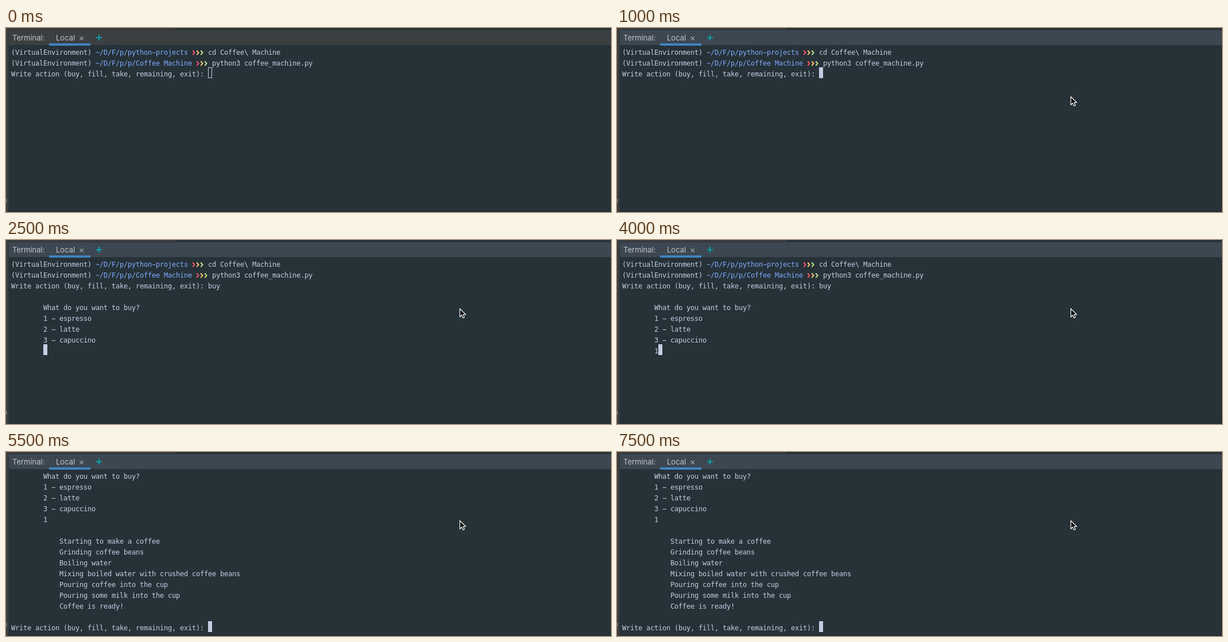
An HTML page with a canvas that plays this animation: 1054x323 px, repeating every 8 s.

```html
<!DOCTYPE html>
<html lang="en">
<head>
<meta charset="utf-8">
<title>Coffee machine terminal</title>
<style>
  html, body { margin: 0; width: 100%; height: 100%; overflow: hidden; background: #263238; }
  canvas { display: block; }
</style>
</head>
<body>
<canvas id="stage" width="1054" height="323"></canvas>
<script>
const ctx = document.getElementById("stage").getContext("2d");
const LOOP = 8000;
const LEFT = 9, TOP = 31, CELL = 7, ROW = 19;
const MONO = '12px "DejaVu Sans Mono", monospace';
const UI = '13px Inter, sans-serif';
const COLOR = {
  back: "#263238", text: "#c3cee3", path: "#82aaff",
  chevrons: ["#ff5370", "#ffcb6b", "#c3e88d"],
  frame: "#3c3f41", focused: "#3d4752", label: "#c0c4c8",
  tab: "#4083c0", plus: "#08a3ad"
};

const ASK = "Write action (buy, fill, take, remaining, exit): ";
const MENU = ["What do you want to buy?", "1 - espresso", "2 - latte", "3 - capuccino"];
const STEPS = [
  "Starting to make a coffee", "Grinding coffee beans", "Boiling water",
  "Mixing boiled water with crushed coffee beans", "Pouring coffee into the cup",
  "Pouring some milk into the cup", "Coffee is ready!"
];

function rect(x, y, w, h, color) {
  ctx.fillStyle = color;
  ctx.fillRect(x, y, w, h);
}

function line(points, color, width) {
  ctx.beginPath();
  points.forEach(([x, y]) => ctx.lineTo(x, y));
  ctx.strokeStyle = color;
  ctx.lineWidth = width;
  ctx.stroke();
}

// Every character sits in its own terminal cell.
function write(row, col, text, color = COLOR.text) {
  ctx.font = MONO;
  ctx.fillStyle = color;
  [...text].forEach((c, i) => {
    const glyph = c === "-" ? "\u2212" : c;
    ctx.fillText(glyph, LEFT + (col + i) * CELL, TOP + row * ROW + 16);
  });
}

function prompt(row, path, command) {
  const env = "(VirtualEnvironment) ";
  const col = env.length + path.length + 1;
  write(row, 0, env);
  write(row, env.length, path, COLOR.path);
  COLOR.chevrons.forEach((color, i) => {
    const x = LEFT + (col + i) * CELL, y = TOP + row * ROW;
    line([[x + 1.2, y + 8.5], [x + 4.6, y + 12.3], [x + 1.2, y + 16.1]], color, 1.9);
  });
  write(row, col + 4, command);
}

function cursor(row, col, hollow) {
  const x = LEFT + col * CELL, y = TOP + row * ROW;
  if (!hollow) return rect(x, y, CELL, ROW, COLOR.text);
  ctx.strokeStyle = COLOR.text;
  ctx.lineWidth = 1;
  ctx.strokeRect(x + 0.5, y + 0.5, CELL - 1, ROW - 1);
}

function menu(row) {
  MENU.forEach((text, i) => write(row + i, 8, text));
}

function panel(active) {
  rect(0, 0, 1054, 323, COLOR.back);
  rect(0, 0, 294, 3, "#393c3e");
  rect(0, 3, 1054, 1, "#313537");
  rect(0, 3, 4, 320, COLOR.frame);
  rect(4, 4, 1, 319, "#303538");
  rect(0, 300, 1, 6, "#a0a4a7");
  rect(5, 4, 1049, 26, active ? COLOR.focused : COLOR.frame);
  rect(5, 322, 1049, 1, "#20282d");
  rect(75, 27, 72, 4, COLOR.tab);

  ctx.font = UI;
  ctx.fillStyle = COLOR.label;
  ctx.fillText("Terminal:", 11, 22);
  ctx.fillText("Local", 87, 22);
  line([[128.5, 15], [135, 21.5]], "#a3a8ac", 1.1);
  line([[135, 15], [128.5, 21.5]], "#a3a8ac", 1.1);
  rect(157, 16, 10, 2, COLOR.plus);
  rect(161, 12, 2, 10, COLOR.plus);
}

function pointer(x, y) {
  const shape = [[0.7, 1.2], [0.7, 15.3], [3.9, 12.3], [6, 17.2],
                 [8.5, 16.1], [6.4, 11.4], [10.8, 11.2]];
  ctx.beginPath();
  shape.forEach(([dx, dy]) => ctx.lineTo(x + dx, y + dy));
  ctx.closePath();
  ctx.fillStyle = "#000";
  ctx.fill();
  ctx.strokeStyle = "#fff";
  ctx.lineWidth = 1.2;
  ctx.stroke();
}

function ordering(t) {
  prompt(0, "~/D/F/p/python-projects", "cd Coffee\\ Machine");
  prompt(1, "~/D/F/p/p/Coffee Machine", "python3 coffee_machine.py");
  const typed = t < 1500 ? "" : t < 1750 ? "bu" : "buy";
  write(2, 0, ASK + typed);
  if (t < 2250) cursor(2, ASK.length + typed.length, t < 1000);
  if (t < 2500) return;
  menu(4);
  if (t >= 4000) write(8, 8, "1");
  if (t < 3500) cursor(8, 8);
  else if (t >= 4000) cursor(8, 9);
}

function brewing(t) {
  menu(0);
  write(4, 8, "1");
  STEPS.forEach((text, i) => write(6 + i, 12, text));
  write(14, 0, ASK);
  if (Math.floor((t - 4500) / 500) % 2 === 0) cursor(14, ASK.length);
}

function draw() {
  const t = performance.now() % LOOP;
  panel(t >= 1000);
  if (t < 4500) ordering(t);
  else brewing(t);
  if (t >= 750) pointer(790, 119.5);
  else if (t >= 500) pointer(816, 134.5);
  requestAnimationFrame(draw);
}
draw();
</script>
</body>
</html>
```
